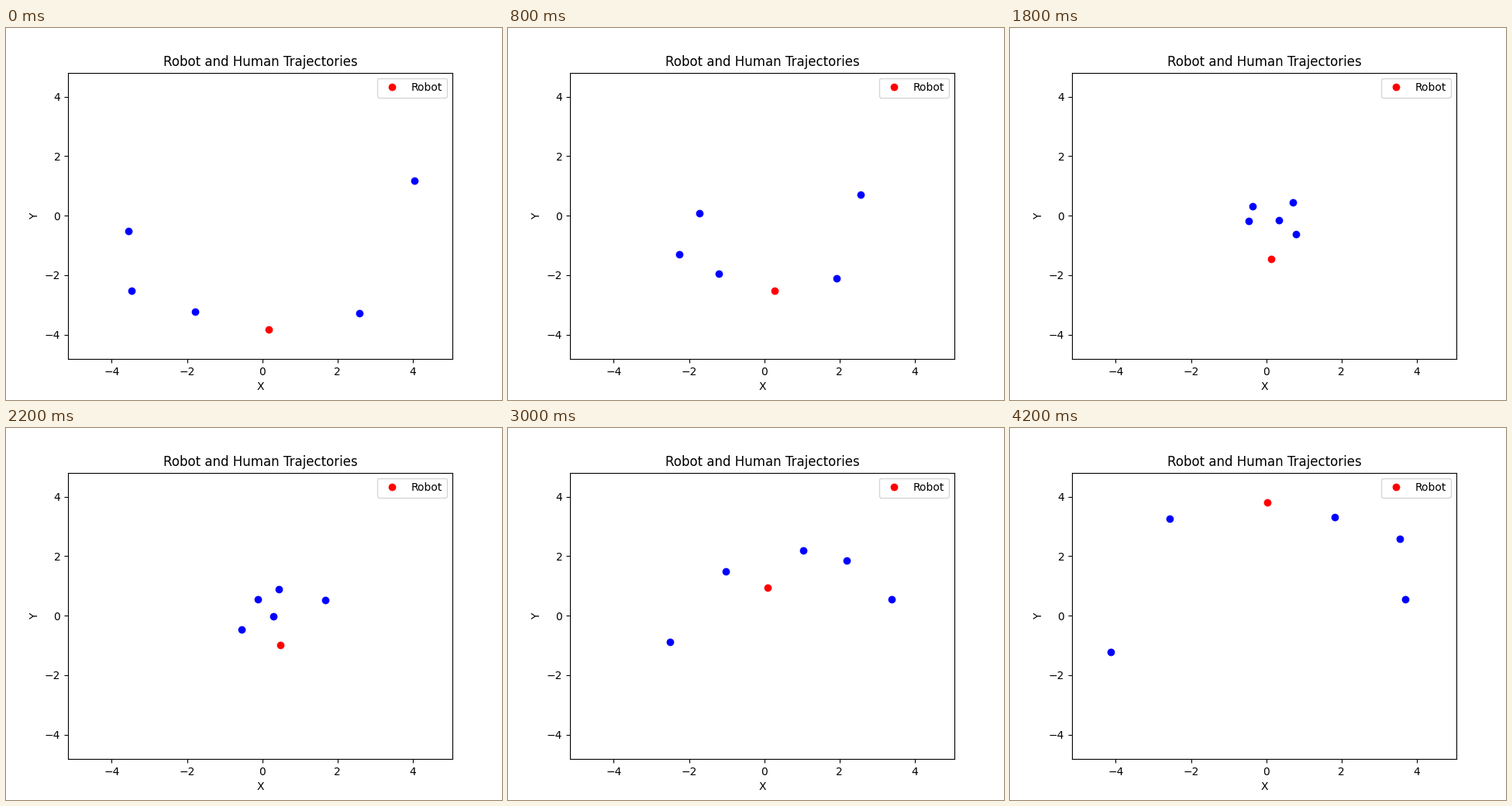
Write a matplotlib script that moves like this. It is 640 px wide and 480 px high and loops after 4300 ms.

```python
import numpy as np
import matplotlib.pyplot as plt
from matplotlib.animation import FuncAnimation

FRAMES, INTERVAL = 43, 100
STEP = 0.25     # distance covered per frame at full speed
FREE = 22       # from this frame on the humans head straight for their goals
CROSSING = [0.75, 8, 14, FREE]    # humans hesitate in the first step


def follow(times, points):
    """Position in each frame along timed waypoints."""
    t = np.arange(FRAMES)
    return np.column_stack([np.interp(t, times, c) for c in zip(*points)])


def cross(*points):
    """Dodge through the middle, then slow down into the opposite side."""
    path = follow(CROSSING, points)
    goal = -1.04 * path[0]
    for k in range(FREE + 1, FRAMES):
        gap = goal - path[k - 1]
        path[k] = path[k - 1] + STEP * gap / max(1, np.hypot(*gap))
    return path


robot = follow([0, 6, 8, 14, 22, 26, 34, 42],
               [(0.17, -3.83), (0.19, -2.51), (0.27, -2.52), (-0.2, -1.92),
                (0.48, -0.99), (0.09, -0.07), (0.09, 1.93), (0.03, 3.81)])
humans = [
    cross((-3.56, -0.52), (-1.72, 0.08), (-0.28, 0.37), (1.68, 0.53)),
    cross((-3.47, -2.52), (-2.26, -1.3), (-1.15, -0.28), (0.44, 0.89)),
    cross((-1.78, -3.23), (-1.21, -1.95), (-0.82, -0.91), (-0.12, 0.55)),
    cross((2.58, -3.28), (1.92, -2.11), (1.28, -1.22), (0.3, -0.02)),
    cross((4.04, 1.18), (2.56, 0.71), (1.24, 0.16), (-0.55, -0.46)),
]
paths = [robot] + humans

fig, ax = plt.subplots(figsize=(6.4, 4.8), dpi=100)
ax.set_xlim(-5.162, 5.053)
ax.set_ylim(-4.823, 4.81)
ax.set_title("Robot and Human Trajectories")
ax.set_xlabel("X")
ax.set_ylabel("Y")

dots = [ax.plot([], [], "ro", label="Robot")[0]]
dots += [ax.plot([], [], "bo")[0] for _ in humans]
ax.legend(loc="upper right")


def draw(k):
    for dot, path in zip(dots, paths):
        dot.set_data(path[k:k + 1].T)
    return dots


anim = FuncAnimation(fig, draw, frames=FRAMES, interval=INTERVAL,
                     repeat=True, repeat_delay=0)
plt.show()
```
